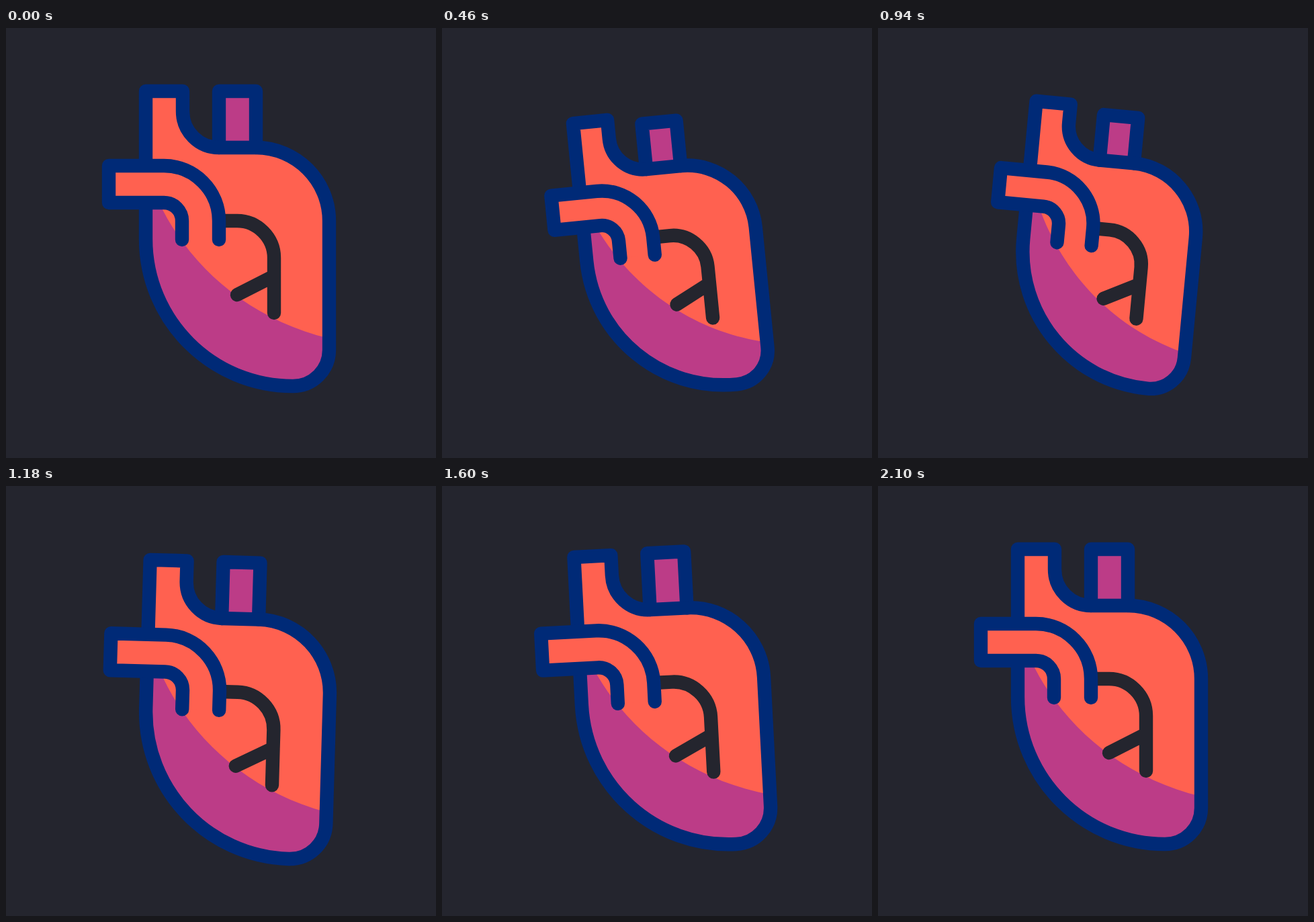
Write an HTML page that moves like this. It is 640x640 px and loops after 2400 ms.

```html
<!DOCTYPE html>
<html lang="en">
<head>
<meta charset="utf-8">
<title>Beating heart</title>
<style>
  html, body { margin: 0; width: 100%; height: 100%; overflow: hidden; background: #24252e; }
  svg { display: block; width: 100vw; height: 100vh; }
  path { fill: none; stroke-width: 20.4; stroke-linecap: round; stroke-linejoin: round; }
  .purple { fill: #bc3c87; }
  .orange { fill: #ff6150; }
  .line { stroke: #002a77; }
  .vein { stroke: #24252e; }
</style>
</head>
<body>
<svg viewBox="0 0 640 640">
  <path id="body" class="purple"></path>
  <path id="upper" class="orange"></path>
  <path id="vein" class="vein"></path>
  <path id="vessel" class="purple line"></path>
  <path id="outline" class="line"></path>
  <path id="artery" class="orange line"></path>
</svg>
<script>
const LOOP = 2400, END = 2100, MID = 320;

// Turning points of the rocking (degrees) and of the bobbing (centre height)
const rock = [[0, 0], [400, -6.2], [880, 5.6], [1550, -3.7], [1800, 3], [END, 0]];
const bob = [[0, 320], [460, 342], [650, 315.5], [1180, 339], [1420, 317], [1800, 336], [END, 320]];

// Eases from one turning point to the next
function swing(keys, time) {
  const next = keys.findIndex(key => key[0] > time);
  if (next < 0) return keys[keys.length - 1][1];
  const [t0, from] = keys[next - 1], [t1, to] = keys[next];
  const t = (time - t0) / (t1 - t0);
  return from + (to - from) * t * t * (3 - 2 * t);
}

// Smooth bump from 0 to 1 and back
function pulse(time, peak, reach) {
  const t = Math.min(1, Math.abs(time - peak) / reach);
  return (1 + Math.cos(Math.PI * t)) / 2;
}

const crown = 'M208,94 L263,94 L263,124 C263,154 287,178 317,178 L372,178 C432,178 481,227 481,287 ';
const heart = crown + 'L481,479 C481,509 457,533 427,533 C306,533 208,435 208,314 Z';
const shapes = {
  body: () => heart,
  outline: () => heart,
  upper: cut => crown +
    `L481,${462 + cut} C360,${433 + cut} 270,${352 + cut / 2} 226,256 L208,230 Z`,
  vein: () => 'M317,287 L344,287 C374,287 399,312 399,342 L399,424 M399,369 L344,397',
  vessel: (cut, drop) => `M317,178 L317,${94 + drop} L372,${94 + drop} L372,178`,
  artery: cut => 'M317,315 L317,287 C317,242 280,205 235,205 ' +
    `L${153 + cut},205 L${153 + cut},260 L235,260 C250,260 262,272 262,287 L262,315`
};
const parts = Object.keys(shapes).map(id => [document.getElementById(id), shapes[id]]);

function draw(time) {
  const squeeze = pulse(time, 460, 240) + pulse(time, 940, 240);
  const bulge = pulse(time, 620, 160);
  const scale = 1 - .065 * squeeze;
  const angle = swing(rock, time) * Math.PI / 180;
  const cos = Math.cos(angle), sin = Math.sin(angle);
  const cy = swing(bob, time);

  // Scales (wider below the middle while bulging), then turns and lifts
  const warp = (match, px, py) => {
    const v = py - MID;
    const x = (px - MID) * (scale + bulge * (.046 + v * (1.8e-4 - 6e-7 * v)));
    const y = v * (scale - .017 * bulge);
    return (MID + x * cos - y * sin).toFixed(2) + ',' + (cy + x * sin + y * cos).toFixed(2);
  };
  const cut = 9 * (squeeze + .85 * bulge), drop = 11.5 * squeeze;
  for (const [el, shape] of parts)
    el.setAttribute('d', shape(cut, drop).replace(/([\d.]+),([\d.]+)/g, warp));
}

const start = performance.now();
function tick() {
  draw((performance.now() - start) % LOOP);
  requestAnimationFrame(tick);
}
tick();
</script>
</body>
</html>
```
